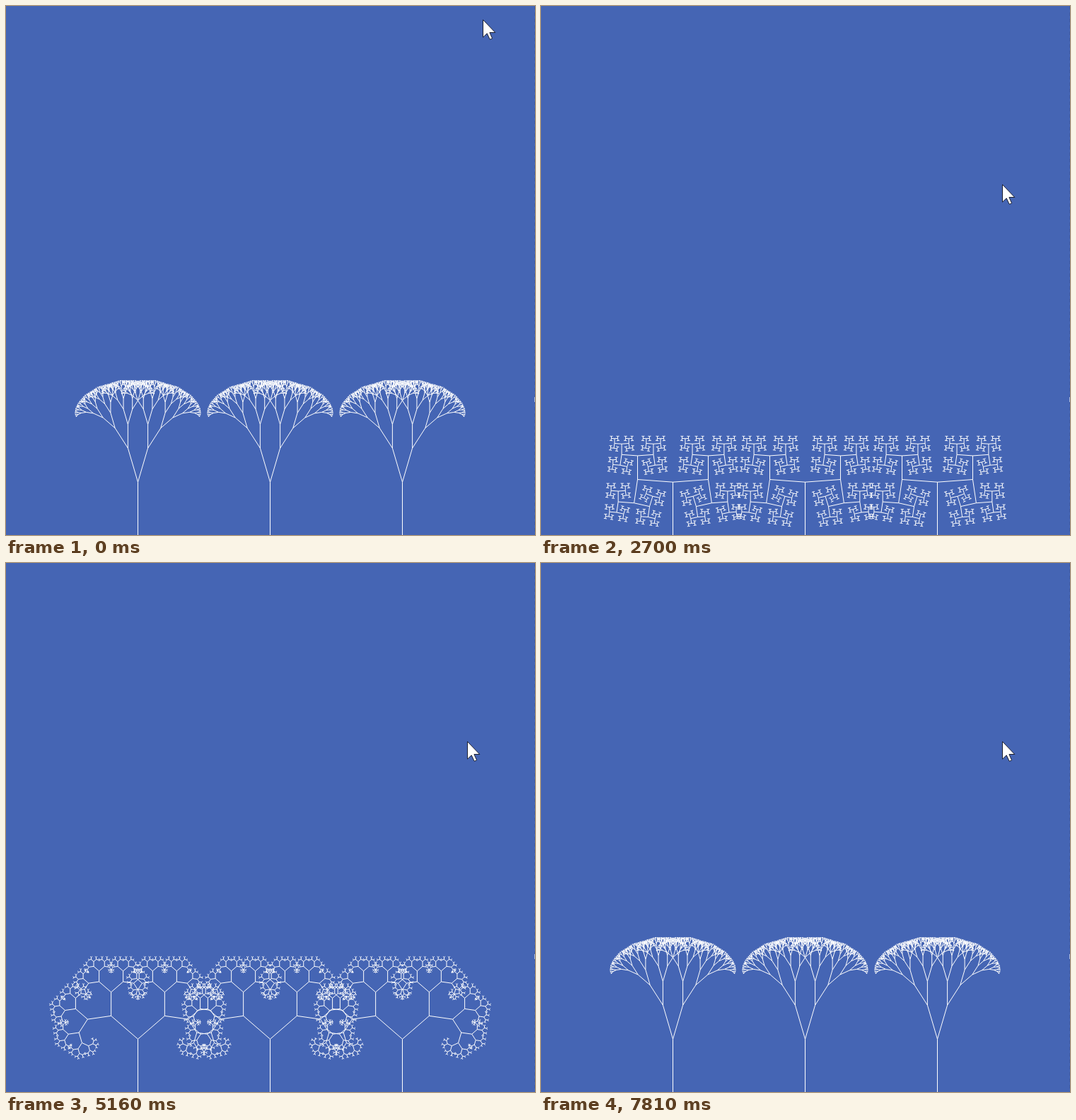
Recreate the animation shown at these times as an HTML page. Size 748 by 748 pixels, loop 7870 ms.

```html
<!DOCTYPE html>
<html lang="en">
<head>
<meta charset="utf-8">
<title>Fractal trees</title>
<style>
  html, body { margin: 0; width: 100%; height: 100%; overflow: hidden; background: #4565b4; }
  svg { display: block; width: 100vw; height: 100vh; }
</style>
</head>
<body>
<svg viewBox="0 0 748 748">
  <rect width="748" height="748" fill="#4565b4"/>
  <path d="M747.5 0V748" stroke="#38549c" stroke-dasharray="5 4" opacity=".6"/>
  <path d="M747.5 553v7" stroke="#a9b8dc"/>
  <g fill="none" stroke="#fff" stroke-width="1">
    <path id="tree"/>
    <use href="#tree" x="187"/>
    <use href="#tree" x="374"/>
  </g>
  <path id="cursor" d="M.5 .5V25.2L6.2 19.8L10.2 28.3L13.6 26.8L9.9 18.5H17.8Z"
        fill="#fff" stroke="#1c2030" stroke-width="1"/>
</svg>
<script>
const LOOP = 7870;
const TRUNK = 74.8, RATIO = 0.67, DEPTH = 9;
const ROOT = { x: 186.5, y: 748 };
const START_ANGLE = 16.36;

// Bursts of turning: first change, last change, number of changes, final angle in degrees
const turns = [
  [70, 130, 2, 4.9],
  [270, 400, 4, -19.5],
  [580, 920, 9, 36],
  [1860, 2330, 9, -38.9],
  [2390, 2570, 4, -79.6],
  [2670, 3300, 12, -154],
  [3400, 3400, 1, -165],
  [3500, 4250, 12, -291.2],
  [4350, 5060, 10, -400],
  [5160, 5910, 12, -508.8],
  [6010, 6740, 13, -614],
  [6840, 7240, 6, -657.7],
  [7340, 7560, 4, -684.5],
  [7690, 7810, 3, -703.64]
];

// Same layout, with the pointer's final x and y
const moves = [
  [1060, 1760, 8, 655, 215],
  [1860, 1860, 1, 652, 252]
];

const tree = document.getElementById('tree');
const cursor = document.getElementById('cursor');

// Share of a burst that is done at time t, in hard steps
function progress(t, [from, to, count]) {
  if (t < from) return 0;
  if (t >= to) return 1;
  return (Math.floor((t - from) / (to - from) * (count - 1) + 1e-6) + 1) / count;
}

function stepped(t, bursts, column, value) {
  for (const burst of bursts) {
    value += (burst[column] - value) * progress(t, burst);
    if (t < burst[1]) break;
  }
  return value;
}

function treePath(degrees) {
  const turn = degrees * Math.PI / 180;
  const parts = [];
  function branch(x, y, heading, length, level) {
    const x2 = x + length * Math.sin(heading);
    const y2 = y - length * Math.cos(heading);
    parts.push(`M${x.toFixed(2)} ${y.toFixed(2)}L${x2.toFixed(2)} ${y2.toFixed(2)}`);
    if (level === DEPTH) return;
    branch(x2, y2, heading + turn, length * RATIO, level + 1);
    branch(x2, y2, heading - turn, length * RATIO, level + 1);
  }
  branch(ROOT.x, ROOT.y, 0, TRUNK, 0);
  return parts.join('');
}

let shown = null;

function render(t) {
  const angle = stepped(t, turns, 3, START_ANGLE);
  if (angle !== shown) {
    tree.setAttribute('d', treePath(angle));
    shown = angle;
  }
  const x = stepped(t, moves, 3, 674);
  const y = stepped(t, moves, 4, 19);
  cursor.setAttribute('transform', `translate(${Math.round(x)} ${Math.round(y)})`);
}

const begin = performance.now();

function frame() {
  render((performance.now() - begin) % LOOP);
  requestAnimationFrame(frame);
}

render(0);
requestAnimationFrame(frame);
</script>
</body>
</html>
```
